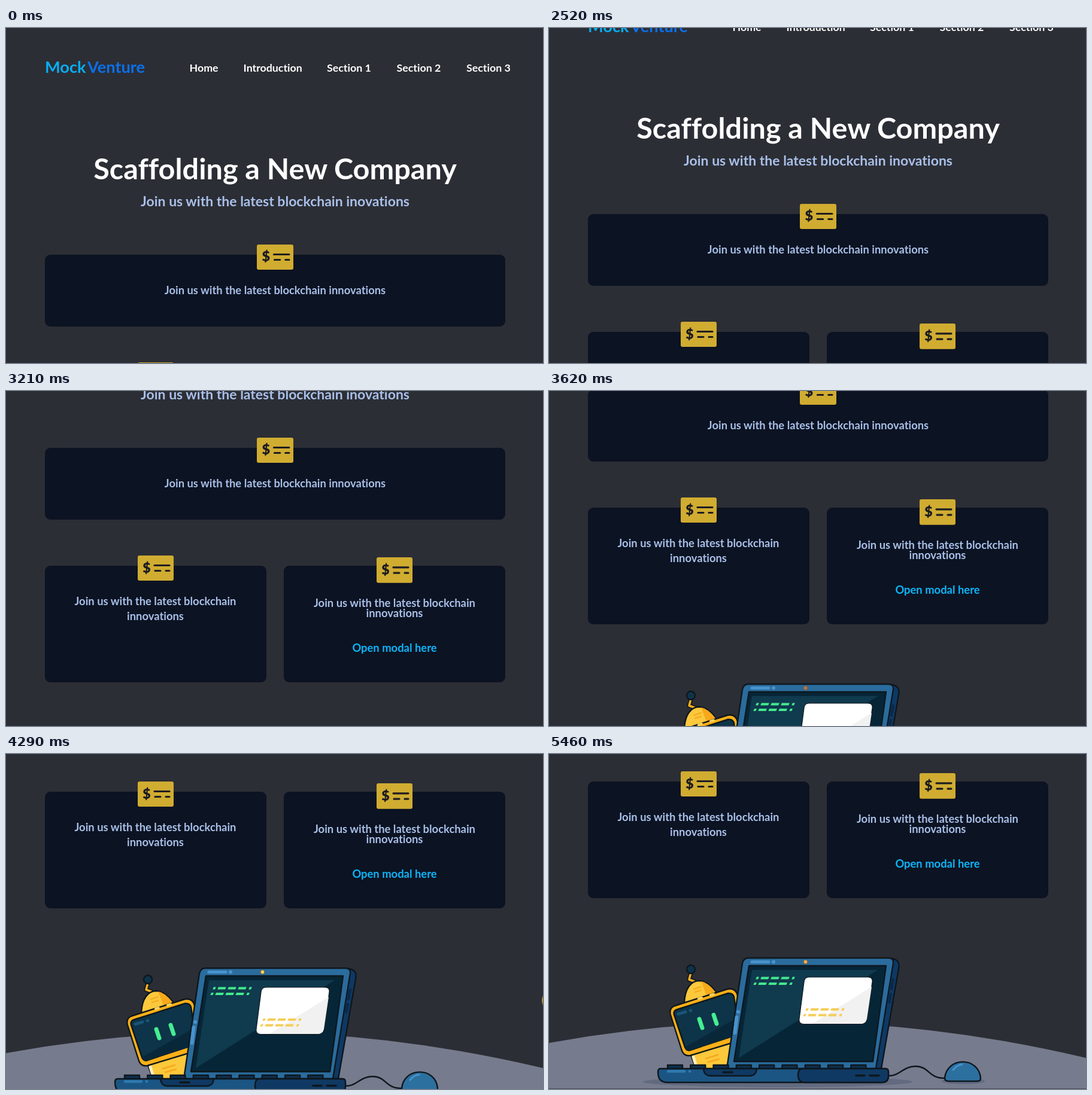
Write an HTML page that moves like this. It is 897 px wide and 560 px high and loops after 6 s.

```html
<!DOCTYPE html>
<html lang="en">
<head>
<meta charset="utf-8">
<title>Landing page scroll</title>
<style>
  html, body { margin: 0; width: 100%; height: 100%; overflow: hidden; background: #2c2e35; }
  svg { display: block; width: 897px; height: 560px; }
  text { font-family: Lato, "Open Sans", sans-serif; font-weight: 700; font-variant-ligatures: none; }
  .nav { font-size: 17.8px; font-weight: 600; fill: #fff; }
  .logo { font-size: 27.2px; }
  .title { font-size: 48.6px; }
  .sub { font-size: 23px; }
  .body { font-size: 18.4px; }
  .mid { text-anchor: middle; fill: #a9c0e9; }
  .title.mid { fill: #fff; }
  .link.mid { fill: #0bb6fb; }
  .card { fill: #0c1322; }
  .ink { stroke: #0e171d; stroke-width: 2.4; stroke-linejoin: round; stroke-linecap: round; }
  .line { fill: none; stroke-linecap: round; }
</style>
</head>
<body>
<svg viewBox="0 0 897 560">
  <defs>
    <g id="cheque">
      <rect width="60" height="42" rx="3" fill="#d0ac31"/>
      <text x="15" y="28.5" text-anchor="middle" font-size="23" style="font-weight:900" fill="#1a1a20">$</text>
      <path d="M28 16.5H53M29 25.5H38M47 25.5H53" class="line" stroke="#1f1e22" stroke-width="3.2"/>
    </g>
    <g id="code" class="line" stroke-width="4" style="stroke-linecap:butt">
      <path d="M0 0H4M8 0H21M25 0H38M42 0H55M60 0H64M0 9.5H4M8 9.5H21M25 9.5H38M42 9.5H55M60 9.5H64" transform="skewX(-22)"/>
    </g>
  </defs>

  <g id="page">
    <g class="logo">
      <text x="65" y="75" fill="#08aef5">Mock</text>
      <text x="136" y="75" fill="#0b70ec">Venture</text>
    </g>
    <g class="nav">
      <text x="306.5" y="73">Home</text>
      <text x="396.5" y="73">Introduction</text>
      <text x="536" y="73">Section 1</text>
      <text x="652.5" y="73">Section 2</text>
      <text x="769" y="73">Section 3</text>
    </g>
    <text class="title mid" x="449.5" y="253">Scaffolding a New Company</text>
    <text class="sub mid" x="449.5" y="298">Join us with the latest blockchain inovations</text>

    <rect class="card" x="65" y="379" width="769" height="120" rx="9"/>
    <use href="#cheque" transform="translate(419 362) scale(1.017 1)"/>
    <text class="body mid" x="449.5" y="445">Join us with the latest blockchain innovations</text>

    <rect class="card" x="65" y="576" width="370" height="195" rx="9"/>
    <use href="#cheque" x="220" y="559"/>
    <text class="body mid" x="249.5" y="642">Join us with the latest blockchain</text>
    <text class="body mid" x="249.5" y="667">innovations</text>

    <rect class="card" x="464" y="576" width="370" height="195" rx="9"/>
    <use href="#cheque" transform="translate(619 562) scale(1 1.02)"/>
    <text class="body mid" x="649" y="645">Join us with the latest blockchain</text>
    <text class="body mid" x="649" y="662">innovations</text>
    <text class="body link mid" x="649" y="720">Open modal here</text>

    <g transform="translate(0 530)">
      <path d="M0 483Q448.5 401.7 897 508V560H0Z" fill="#767b8d"/>
      <g fill="#626a80">
        <ellipse cx="382" cy="548" rx="225" ry="9"/>
        <ellipse cx="692" cy="547" rx="36" ry="5"/>
      </g>

      <!-- robot -->
      <g class="ink">
        <path d="M236 500L246 528H312V478Z" fill="#fcc83c"/>
        <path d="M241 506L247 525" class="line" stroke="#fff0c0" stroke-width="5"/>
        <path d="M262 509L282 503M266 515L284 510" class="line" stroke="#f5a81b"/>
        <path d="M237 366L234 377L245 381" class="line" stroke-width="7"/>
        <path d="M237 366L234 377L245 381" class="line" stroke="#f9b021" stroke-width="3.5"/>
        <circle cx="237" cy="360" r="7" fill="#0e344b"/>
        <path d="M226 416C227 392 237 379 251 379C264 380 274 390 282 402Z" fill="#fcc83c"/>
        <path d="M254 380C266 383 273 391 280 401L264 406Z" fill="#f6a91a" stroke="none"/>
        <path d="M242 393L254 389M244 398L254 395" class="line" stroke="#f6a91a" stroke-width="2"/>
        <path d="M210 421L298 393Q312 390 315 404L322 478L236 504Q226 506 222 496L203 436Q200 425 210 421Z" fill="#fbb017"/>
        <path d="M214 427L299 400Q307 399 309 406L318 468L236 495Q230 497 227 490L209 436Q207 429 214 427Z" fill="#0d3448"/>
        <path d="M250 409L255 407.5M270 403L275 401.5" class="line" stroke="#fbd25c" stroke-width="4"/>
      </g>
      <path d="M227 490L316 440L320 468L236 495Q230 497 227 490Z" fill="#08283a"/>
      <path d="M216 434.5L228 431M236 429L237 428.8" class="line" stroke="#185477" stroke-width="5"/>
      <path d="M251 443L256 458M275 436L280 451" class="line" stroke="#45ee90" stroke-width="7"/>

      <!-- lid -->
      <g class="ink">
        <path d="M560 342H573Q587 344 584 359L555 526H530Z" fill="#0e3965"/>
        <path d="M575 377L572 393M571 401L568.5 415" class="line" stroke="#0a2748" stroke-width="4"/>
        <path d="M333 341H567Q576 341 575 350L546 526H297L323 350Q325 341 333 341Z" fill="#2a6c9d"/>
        <path d="M334 354H563L541 514H309Z" fill="#062638"/>
      </g>
      <path d="M339 361H549L317 508Z" fill="#103a4e"/>
      <g class="line" stroke="#4893cd">
        <path d="M339 347.5H367" stroke-width="5"/>
        <path d="M313.5 440L310.5 466" stroke-width="6"/>
        <path d="M375 347.5h.1M316 431h.1" stroke-width="6"/>
      </g>
      <circle id="led" cx="428.5" cy="347.5" r="3.4" stroke="#7d5a39"/>
      <use href="#code" x="346" y="374.5" stroke="#43e98d"/>
      <path d="M434 373H533Q541 373 540 381L531 443Q529 451.5 521 451.5H425Q417 451 418 443L426 381Q427 373 434 373Z" fill="#fff" stroke="#0e171d" stroke-width="1.2"/>
      <path d="M539 389L531 443Q529 451 521 451H440Z" fill="#f1f1f1"/>
      <use href="#code" x="429" y="427" stroke="#f6cd58"/>

      <!-- keyboard -->
      <g id="keys" class="ink" fill="#0e3150"></g>
      <g class="ink">
        <path d="M186 526H562Q567 526 567 532V538Q567 549 556 549H198Q182 549 182 532Q182 526 186 526Z" fill="#1b5583"/>
        <path d="M424 526H562Q567 526 567 532V538Q567 549 556 549H426Q416 548 416 537Q416 526 424 526Z" fill="#0f3963"/>
        <path d="M258 526H347Q346 538 335 538H270Q259 538 258 526Z" fill="#0f3963"/>
        <path d="M291 532H306M513 537.5H527M536 537.5H551" class="line" style="stroke-width:3.6"/>
      </g>
      <path d="M199 530.5H226M235 530.5h.1" class="line" stroke="#2f79b0" stroke-width="4.5"/>

      <!-- mouse -->
      <path d="M568 538C586 538 592 522 612 522C636 522 632 542 662 542" class="ink line"/>
      <path d="M661 542C664 506 718 505 721 542Q721 547 715 547H668Q661 547 661 542Z" fill="#2c709f" class="ink"/>
      <path d="M675 528Q681 520 690 519" class="line" stroke="#4893cd" stroke-width="3"/>
      <path d="M0 559.5H897" stroke="#4a4d57"/>
    </g>
  </g>
  <circle id="pointer" r="17" fill="#d8b52c" fill-opacity=".75"/>
</svg>

<script>
  const LOOP = 6000, START = 2240, STEP = 68.86;
  const byId = id => document.getElementById(id);
  const page = byId('page'), led = byId('led'), pointer = byId('pointer');

  byId('keys').innerHTML = Array.from({ length: 9 }, (_, i) =>
    `<path d="M${198 + i * 38.3} 526v-6h25v6z"/>`).join('');

  // step, offset, speed per step
  const scrollKeys = [
    [0, 6, 11], [9, 174, 21.5], [14, 284, 19],
    [20, 381, 15], [30, 513, 7], [35, 530, 0]
  ];
  // step, x, y
  const edgePath = [[29, 912, 408], [30, 912, 412], [35, 912, 439]];
  const exitPath = [[39, 909, 452], [43, 876, 500], [46, 880, 570]];

  const segment = (keys, step) => {
    const i = keys.findIndex((k, n) => n && step <= k[0]);
    return [keys[i - 1], keys[i]];
  };

  function scrollAt(step) {
    if (step < 0) return 0;
    if (step >= 35) return 530;
    const [[s0, y0, v0], [s1, y1, v1]] = segment(scrollKeys, step);
    const d = s1 - s0, u = (step - s0) / d, w = 1 - u;
    return Math.round(y0 * w * w * (1 + 2 * u) + y1 * u * u * (3 - 2 * u)
      + d * u * w * (v0 * w - v1 * u));
  }

  function pointerAt(step) {
    const path = [edgePath, exitPath].find(p => step >= p[0][0] && step <= p[2][0]);
    if (!path) return [-50, -50];
    const [a, b] = segment(path, step), u = (step - a[0]) / (b[0] - a[0]);
    return [a[1] + (b[1] - a[1]) * u, a[2] + (b[2] - a[2]) * u];
  }

  function draw(now) {
    const time = now % LOOP;
    const step = time < START ? -1 : Math.floor((time - START) / STEP + .25);
    const [x, y] = pointerAt(step);
    page.setAttribute('transform', `translate(0 ${-scrollAt(step)})`);
    pointer.setAttribute('transform', `translate(${x} ${y})`);
    led.setAttribute('fill', step < 24 ? '#b8754a' : step < 33 ? '#fbd05e' : '#f5b04d');
    requestAnimationFrame(draw);
  }
  draw(performance.now());
</script>
</body>
</html>
```
